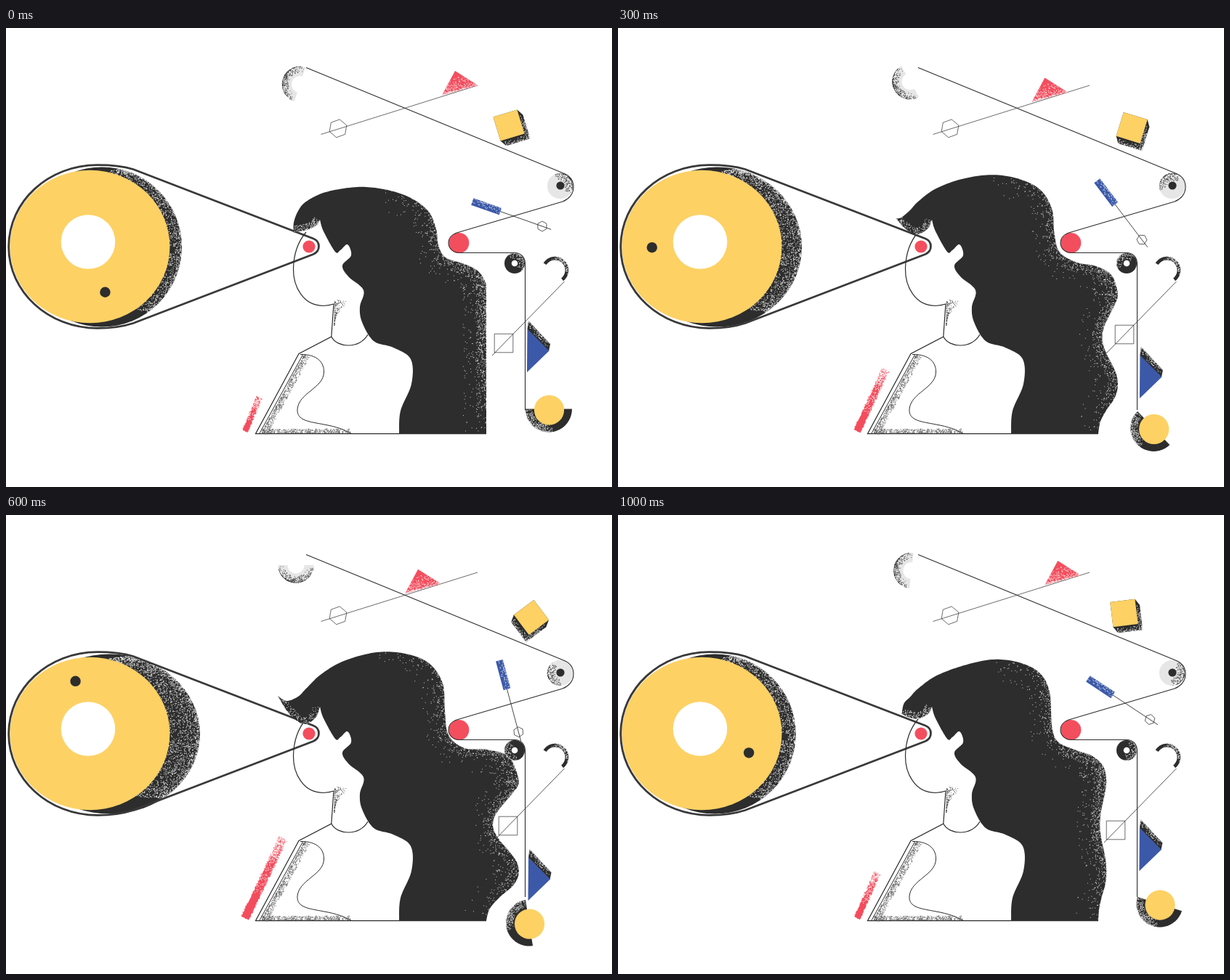
Recreate the animation shown at these times as an HTML page with a canvas. Size 834 by 632 pixels, loop 1.1 s.

```html
<!DOCTYPE html>
<html lang="en">
<head>
<meta charset="utf-8">
<title>Belt and eye</title>
<style>
html, body { margin: 0; width: 100%; height: 100%; overflow: hidden; background: #fff; }
canvas { display: block; }
</style>
</head>
<body>
<canvas id="stage" width="834" height="632"></canvas>
<script>
const ctx = document.getElementById('stage').getContext('2d');
const INK = '#2d2d2d', YELLOW = '#fdd164', RED = '#f34e5e', BLUE = '#3b59a8', GREY = '#e6e6e6', WHITE = '#fff';
const LOOP = 1100, TICKS = 9, PEAK = 5;
const RAD = Math.PI / 180;

// Key points of the hair: x, y at rest, then the travel to the peak.
const FRINGE = [[432, 264, 0, 0], [427, 272, -1, 7], [414, 278, -4, 10], [404, 280, -14, -6], [396, 282, -22, -33]];
const CROWN = [[396, 268, -10, -12], [402, 252, 0, -2], [413, 239, 0, 0], [440, 226, -6, -7], [483, 219, -18, -18],
  [520, 222, -10, -33], [555, 233, -5, -42], [581, 252, 1, -48], [592, 277, 9, -45]];
const SHOULDER = [[595, 299, 9, -29], [605, 316, 4, -13], [631, 325, 0, -4], [650, 335, 12, -12], [660, 351, 32, -18]];
const FACE_EDGE = [[541, 558], [543, 527], [558, 490], [557, 456], [533, 440], [506, 431], [490, 405], [487, 384],
  [492, 361], [471, 342], [463, 327], [475, 313], [470, 298], [460, 306], [453, 308], [437, 280], [432, 264]];

let tick = 0;
let seed = 1;

function rand() {
  seed = (seed + 0x6D2B79F5) | 0;
  let t = Math.imul(seed ^ (seed >>> 15), 1 | seed);
  t = (t + Math.imul(t ^ (t >>> 7), 61 | t)) ^ t;
  return ((t ^ (t >>> 14)) >>> 0) / 4294967296;
}

const lerp = (a, b, k) => a + (b - a) * k;

// Out to the peak and back again.
const reach = (power = 1) => (tick < PEAK ? tick / PEAK : (TICKS - tick) / (TICKS - PEAK)) ** power;
const swing = (from, to, power) => lerp(from, to, reach(power));

// The crown sinks slowly, then drops when the loop restarts.
const crownReach = () => tick < PEAK ? tick / PEAK : 1 - .1 * (tick - PEAK);

// One full turn per loop, held back in the middle.
const spin = lag => 360 * tick / TICKS - lag * Math.sin(Math.PI * tick / TICKS);

const moved = (points, kx, ky) => points.map(([x, y, dx, dy]) => [x + dx * kx, y + dy * ky]);

// Catmull-Rom curve through the points, as a dense polyline.
function spline(p, n = 12) {
  const out = [], last = p.length - 1;
  for (let i = 0; i < last; i++) {
    const a = p[Math.max(i - 1, 0)], b = p[i], c = p[i + 1], d = p[Math.min(i + 2, last)];
    for (let s = 0; s < n; s++) {
      const t = s / n;
      out.push([0, 1].map(k => b[k] + .5 * t * (c[k] - a[k] +
        t * (2 * a[k] - 5 * b[k] + 4 * c[k] - d[k] + t * (3 * (b[k] - c[k]) + d[k] - a[k])))));
    }
  }
  return [...out, p[last]];
}

function arcPoints(x, y, r, from, to) {
  return Array.from({ length: 25 }, (_, i) => {
    const a = lerp(from, to, i / 24) * RAD;
    return [x + r * Math.cos(a), y + r * Math.sin(a)];
  });
}

function poly(points) {
  const path = new Path2D();
  points.forEach(p => path.lineTo(p[0], p[1]));
  path.closePath();
  return path;
}

function ellipse(x, y, rx, ry) {
  const path = new Path2D();
  path.ellipse(x, y, rx, ry, 0, 0, 2 * Math.PI);
  return path;
}

function fill(path, color) {
  ctx.fillStyle = color;
  ctx.fill(path);
}

function stroke(path, width = 1, color = INK) {
  ctx.lineWidth = width;
  ctx.strokeStyle = color;
  ctx.stroke(typeof path === 'string' ? new Path2D(path) : path);
}

const disc = (x, y, r, color) => fill(ellipse(x, y, r, r), color);

function hexagon(x, y, r, turn) {
  stroke(poly([0, 1, 2, 3, 4, 5].map(i => {
    const a = (turn + i * 60) * RAD;
    return [x + r * Math.cos(a), y + r * Math.sin(a)];
  })), .7);
}

// Random spots beside a polyline, crowded at the line and thinning to its right;
// fade also thins them toward both ends.
function beside(line, depth, power = 2, fade = 0) {
  const steps = line.length - 1;
  const len = i => Math.hypot(line[i + 1][0] - line[i][0], line[i + 1][1] - line[i][1]);
  const longest = Math.max(...line.slice(1).map((_, i) => len(i)));
  return () => {
    let i, k;
    do {
      i = Math.floor(rand() * steps);
      k = rand();
    } while (rand() * longest > len(i) || rand() > Math.sin(Math.PI * (i + k) / steps) ** fade);
    const a = line[i], b = line[i + 1], d = depth * rand() ** power / (len(i) || 1);
    return [lerp(a[0], b[0], k) - (b[1] - a[1]) * d, lerp(a[1], b[1], k) + (b[0] - a[0]) * d];
  };
}

function grain(clip, color, count, place, size = 1) {
  ctx.save();
  if (clip) ctx.clip(clip);
  ctx.globalAlpha = .75;
  ctx.fillStyle = color;
  for (let i = 0; i < count; i++) {
    const [x, y] = place();
    ctx.fillRect(x - size / 2, y - size / 2, size, size);
  }
  ctx.restore();
}

function placed(x, y, turn, draw) {
  ctx.save();
  ctx.translate(x, y);
  ctx.rotate(turn * RAD);
  draw();
  ctx.restore();
}

function bigDisc() {
  const grow = swing(0, 25, 1.6);
  const cx = 132 + grow * .44, rx = 110 + grow * .56;
  const shadow = ellipse(cx, 301.5, rx, 110);
  fill(shadow, INK);
  grain(shadow, WHITE, 50 * (grow + 22), () => {
    const a = lerp(-78, 55, rand()) * RAD, k = rand() ** 1.6;
    return [lerp(cx + rx * Math.cos(a), 115 + 110 * Math.cos(a), k),
      lerp(301.5 + 110 * Math.sin(a), 301 + 105 * Math.sin(a), k)];
  }, 1.1);
  fill(ellipse(115.5, 301, 110, 105.3), YELLOW);
  disc(113, 294.5, 37.3, WHITE);
  const a = (74 + spin(22)) * RAD;
  disc(117 + 70.5 * Math.cos(a), 296 + 70.5 * Math.sin(a), 7.2, INK);
  stroke('M175 194.5 C160 190 143 188.7 126 188.7 C58 188.7 3.7 239 3.7 301.3 C3.7 363 58 413.4 126 413.4 ' +
    'C143 413.4 160 411.5 175 406.5 L423 311.5 C433 307 433 294 423 290 Z', 2.8, '#393939');
}

function body() {
  stroke('M413 281 C402 294 396 310 395.5 331 C395 356 409 382.5 437 382.5 Q445 382 451 380 L447.8 425 ' +
    'L403 448.5 L343.5 558.7 H661', 1.2);
  stroke('M447.8 425 C456 441 487 442 498 422', 1.2);
  stroke('M409 449 L349 558 M405 449.5 C430 449 438 462 437.5 474 C437 496 403 502 401 525 ' +
    'C400 541 418 542 438 546 C455 549 465 553 475 558');
  grain(null, '#555', 650, beside([[352, 557], [411, 449]], 8, 1.5));
  grain(null, '#555', 520, beside([[474, 558], [352, 558]], 6, 1.4));
  grain(null, '#444', 150, () => {
    const v = rand() ** 1.5;
    return [452 + rand() ** 1.5 * 18 * (1 - v) ** 2, 380 + v * 30 - rand() * 6 * (1 - v)];
  });
}

function hair() {
  const k = reach(), under = spline(moved(FRINGE, k, k));
  const back = [];
  for (let y = 366; y < 558; y += 16) {
    const wave = 27 + 18 * Math.cos((y - 362) * Math.PI / 64);
    back.push([661 + k * wave * Math.min(1, (558 - y) / 40), y]);
  }
  const outer = spline([...moved(FRINGE.slice(-1), k, k), ...moved(CROWN, k, crownReach()),
    ...moved(SHOULDER, k, k), ...back, [661, 558]]);
  const shape = poly([...under, ...outer, ...spline(FACE_EDGE)]);
  fill(shape, INK);
  grain(shape, WHITE, 150, beside(under, 9, 1.4));
  const lit = outer.slice(72);
  grain(shape, WHITE, 800, beside(lit, 14, 1.6, .8));
  grain(shape, WHITE, 380, beside(lit, 32, 1.5, .8));
}

function stripe() {
  const x0 = 329, y0 = 555, dx = swing(20, 53), dy = swing(-47, -111), w = swing(8, 12);
  const len = Math.hypot(dx, dy);
  const spot = (k, side) => [x0 + dx * k - dy / len * side, y0 + dy * k + dx / len * side];
  const h = w / 2 - .5;
  fill(poly([spot(0, -h), spot(.75, -h + 1), spot(.75, h - 1), spot(0, h)]), RED);
  grain(null, RED, len * 6, () => spot(rand(), (rand() - .5) * w), 1.5);
  grain(null, WHITE, len * 1.8, () => spot(1 - rand() ** 1.8 * .7, (rand() - .5) * w), 1.2);
}

function greyArc() {
  placed(swing(404.5, 399, 1.6), swing(77.5, 69, 1.6), swing(198, 90, 1.6), () => {
    const ring = poly([...arcPoints(0, 0, 24.7, -90, 90), ...arcPoints(0, 0, 11.5, 90, -90)]);
    fill(ring, GREY);
    grain(ring, INK, 330, beside(arcPoints(0, 0, 24.7, -85, 85), 9, 2.6, .7));
  });
}

function redTriangle() {
  stroke('M433.5 146.5 L649 79', .7);
  hexagon(457, 138.3, 12.6, -80);
  const dx = swing(0, -51);
  placed(dx, -dx * .31, 0, () => {
    const shape = poly([[618, 59], [649.5, 79], [600, 92.5]]);
    fill(shape, RED);
    grain(shape, WHITE, 330, beside([[649, 79], [600, 92]], 20, 2.3));
  });
}

function cube() {
  placed(swing(692, 723, 1.4), swing(134, 141, 1.4), swing(-17, 53, 1.4), () => {
    const h = 17.2, ox = 10.5 * Math.cos(58 * RAD), oy = 10.5 * Math.sin(58 * RAD);
    const rim = [[h + ox, -h + oy], [h + ox, h + oy], [-h + ox, h + oy]];
    const block = poly([[-h, -h], [h, -h], ...rim, [-h, h]]);
    fill(block, INK);
    grain(block, WHITE, 170, beside(rim, 6, 2));
    fill(poly([[-h, -h], [h, -h], [h, h], [-h, h]]), YELLOW);
  });
}

function lever() {
  placed(swing(704, 696), swing(261, 264), swing(19.5, 75), () => {
    stroke('M-30 0 H49', .8);
    hexagon(36, 0, 7, 10);
    const bar = poly([[-66, -5], [-25, -5], [-25, 5], [-66, 5]]);
    fill(bar, BLUE);
    grain(bar, WHITE, 80, beside([[-66, -5], [-25, -5]], 8, 1.8));
  });
}

function hook() {
  stroke('M768.5 349 L669 451', .8);
  const slide = 12 * Math.max(0, Math.sin(Math.PI * tick / 6));
  placed(685 + slide, 434 - slide, 0, () => stroke('M-12.8 -12.8 H12.8 V12.8 H-12.8 Z', .7));
  const ring = poly([...arcPoints(755.5, 333.5, 18.7, -148, 52), ...arcPoints(755.5, 333.5, 14, 52, -148)]);
  fill(ring, INK);
  grain(ring, WHITE, 90, beside(arcPoints(755.5, 333.5, 18.7, -120, 35), 4, 1.2, 1));
}

function wheels() {
  const turn = -40 - spin(40);
  const rim = (x, y, r) => beside(arcPoints(x, y, r, turn - 95, turn + 95), r * .6, 2.2, 1);
  disc(762.5, 217.5, 17.7, GREY);
  grain(ellipse(762.5, 217.5, 17.7, 17.7), INK, 190, rim(762.5, 217.5, 17.7));
  disc(763, 217, 5.6, INK);
  disc(700, 324, 14, INK);
  grain(ellipse(700, 324, 14, 14), WHITE, 100, rim(700, 324, 14));
  disc(700, 324, 4.3, WHITE);
  disc(623.3, 296, 14, RED);
  stroke('M413 54.5 L766 199.5 C776 203 781 210 781 219 C781 229 774 236 766 239 L622 281.5 ' +
    'C613 284 609 290 609 296 C609 303 615 309.5 624 309.5 H700 C709 309.5 714.5 316 714.5 325 V526', 1.1);
}

function slider() {
  placed(swing(0, 1.5), swing(0, 57, .9), 0, () => {
    const top = [[719, 403], [749, 435]];
    const side = poly([...top, [747, 445], [717.5, 415]]);
    fill(side, INK);
    grain(side, WHITE, 110, beside(top, 7, 1.8));
    fill(poly([[717.5, 414.5], [747.5, 444.5], [717, 474]]), BLUE);
  });
}

// The cup hangs from one end of its rim.
function cup() {
  const x = 715, y = swing(524.5, 530), turn = swing(0, 81, 1.1);
  placed(x, y, turn, () => {
    const bowl = poly(arcPoints(32, 0, 32, 0, 180));
    fill(bowl, INK);
    grain(bowl, WHITE, 250, beside(arcPoints(32, 0, 32, 80, 180), 10, 1.8, .4));
  });
  disc(x + 32 * Math.cos(turn * RAD) + .5, y + 32 * Math.sin(turn * RAD) + 1.5, 20.6, YELLOW);
}

const PARTS = [bigDisc, body, hook, hair, stripe, greyArc, redTriangle, cube, lever, wheels, slider, cup];

function draw() {
  ctx.fillStyle = WHITE;
  ctx.fillRect(0, 0, 834, 632);
  PARTS.forEach((part, i) => {
    seed = 100 + i * 977;
    part();
  });
  disc(417, 301, 8.6, RED);
}

const start = performance.now();
let shown = -1;
function run(now) {
  const n = Math.floor(Math.max(0, now - start) % LOOP / 100);
  // Ticks 4 and 5 last twice as long as the others.
  tick = n - (n > 4) - (n > 6);
  if (tick !== shown) draw();
  shown = tick;
  requestAnimationFrame(run);
}
run(start);
</script>
</body>
</html>
```
